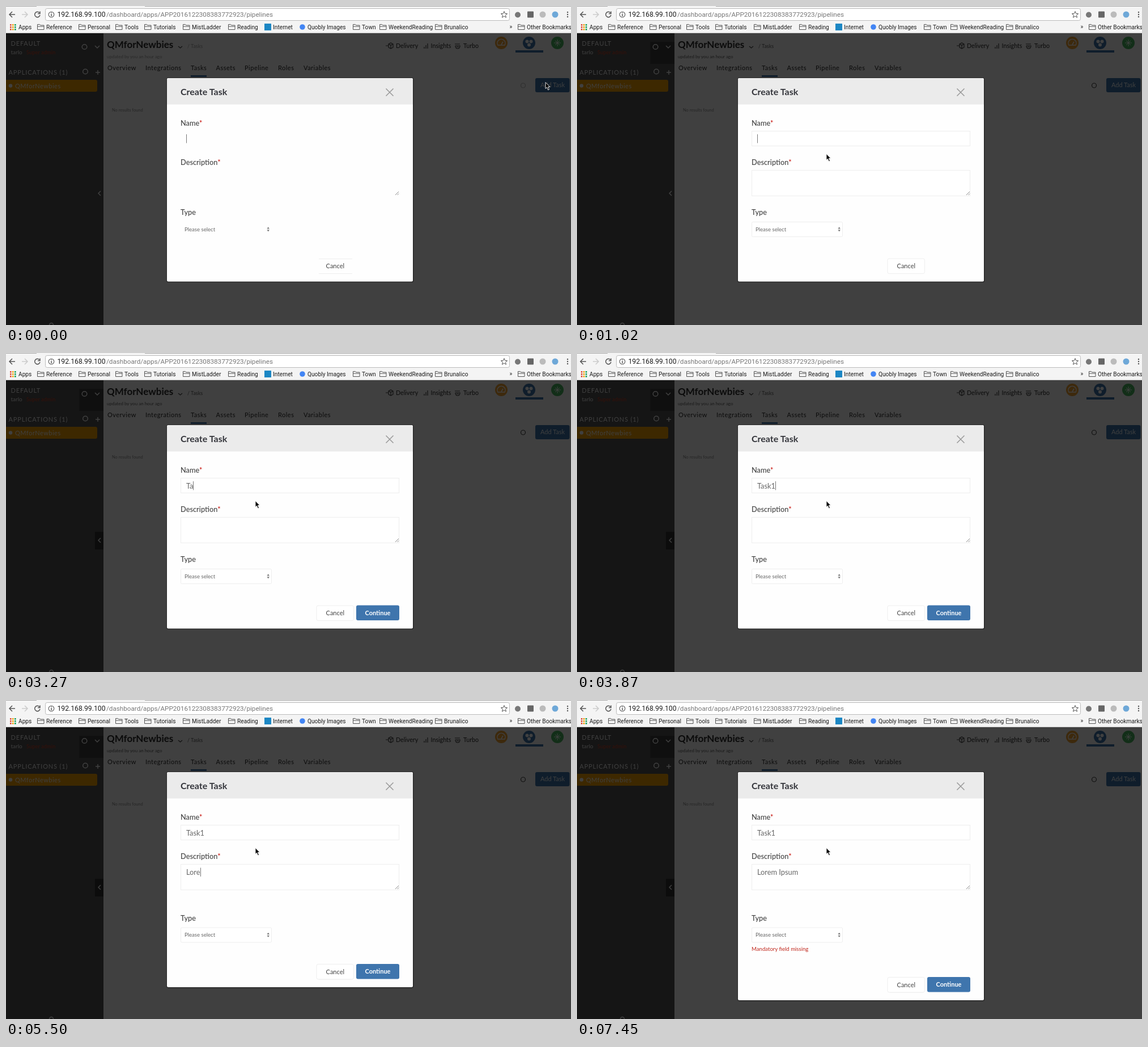
Write an HTML page that moves like this. It is 997 px wide and 562 px high and loops after 8 s.

```html
<!DOCTYPE html>
<html lang="en">
<head>
<meta charset="utf-8">
<title>Create task</title>
<style>
  html, body { margin: 0; width: 100%; height: 100%; overflow: hidden; background: #404040; }
  svg { display: block; width: 997px; height: 562px; }
  text { font-family: Lato, sans-serif; white-space: pre; }
  .chrome text { font-family: Roboto, sans-serif; font-size: 10.2px; fill: #1c1c1c; }
  .chrome .host { font-size: 12.2px; }
  .chrome .path { font-size: 11.7px; fill: #777; }
  .line { fill: none; stroke: #555; stroke-width: 1.5; }
  .dark { fill: none; stroke: #111; stroke-width: 1.2; }
  .tabs text { font-size: 11px; letter-spacing: .5px; fill: #0b0b0b; }
  .tools text { font-size: 10.7px; fill: #0b0b0b; }
  .side text { font-size: 11px; letter-spacing: .85px; fill: #404040; }
  .side .line { stroke: #404040; }
  .label { font-size: 12.8px; font-weight: 500; fill: #444; }
  .star { fill: #c8150f; }
  .typed { font-size: 12.8px; fill: #666; }
  .small { font-size: 9.6px; fill: #666; }
  .error { font-size: 9.6px; fill: #c0271c; }
  .button { font-size: 11px; text-anchor: middle; }
  .field { fill: #fff; stroke: #eee; }
</style>
</head>
<body>
<svg viewBox="0 0 997 562">
  <rect width="997" height="562" fill="#404040"/>

  <g class="side">
    <rect y="48" width="172" height="514" fill="#151515"/>
    <rect id="corner" x="129.5" y="63.5" width="42.5" height="38.5" fill="#0f0f0f"/>
    <rect id="handle" x="157" y="315" width="15" height="31" fill="#0c0c0c"/>
    <text x="8.5" y="69.5">DEFAULT</text>
    <text x="8.5" y="85" style="font-size:10px;letter-spacing:0">tarlo</text>
    <text x="36" y="85" style="font-size:9.4px;letter-spacing:0;fill:#36110a">Super admin</text>
    <circle class="line" cx="138.5" cy="72" r="4.3"/>
    <path class="line" d="M157 70l4 4 4-4" stroke-width="2"/>
    <text x="4.5" y="120.5">APPLICATIONS (1)</text>
    <circle class="line" cx="140" cy="115.5" r="4.3"/>
    <path class="line" d="M158 117h8M162 113v8"/>
    <path d="M0 130h158q3 0 3 3v15q0 3-3 3h-158z" fill="#3d2800"/>
    <circle cx="8" cy="140.5" r="3.3" fill="#404040"/>
    <text x="16" y="144.5" style="letter-spacing:.5px">QMforNewbies</text>
    <path class="line" d="M167 326l-4 4 4 4"/>
    <circle class="line" cx="80" cy="562" r="3.5"/>
  </g>

  <text x="178" y="74" font-size="17" font-weight="700" fill="#0b0b0b">QMforNewbies</text>
  <path class="dark" d="M304 71l3.5 3 3.5-3" stroke-width="2"/>
  <g id="crumbs" fill="#191919">
    <text x="320" y="74" font-size="9">/ Tasks</text>
    <text x="178" y="91.5" font-size="8">updated by you an hour ago</text>
  </g>
  <g class="tabs" id="tabs"></g>
  <rect x="326" y="122" width="28" height="3" fill="#0f1d2b"/>
  <text x="187" y="185.5" font-size="7.5" fill="#252525">No results found</text>

  <g class="tools">
    <path class="dark" d="M670 70h5M675 67l4-2 4 2v6l-4 2-4-2zM675 67l4 2 4-2M679 69v6"/>
    <text x="688" y="74">Delivery</text>
    <path class="dark" d="M738 75v-3M741 75v-6M744 75v-9" stroke-width="2"/>
    <text x="749.5" y="74">Insights</text>
    <path class="dark" d="M792 67h9M793 70h8q0 5-4 5t-4-5M795 72h4"/>
    <text x="807" y="74">Turbo</text>
  </g>
  <circle cx="874" cy="65" r="11" fill="#3d290c"/>
  <path d="M868 69a7 7 0 1 1 12 0zM874 68l3-5" fill="none" stroke="#404040" stroke-width="1.5"/>
  <circle cx="923" cy="65" r="11" fill="#0f1d2b"/>
  <g fill="#404040"><circle cx="919.5" cy="62.5" r="3"/><circle cx="926.5" cy="62.5" r="3"/><circle cx="923" cy="68.5" r="3"/></g>
  <rect x="899" y="78" width="49" height="4" fill="#0f1d2b"/>
  <circle cx="973" cy="65" r="11" fill="#122e18"/>
  <path d="M967 65h12M973 59v12M969 61l8 8M977 61l-8 8" stroke="#404040"/>
  <circle id="spinner" class="dark" cx="912.5" cy="140" r="4"/>
  <rect x="934" y="127" width="60.5" height="25" rx="3" fill="#0f1d2b"/>
  <text class="button" x="964.5" y="143" fill="#404040">Add Task</text>

  <g class="chrome">
    <rect width="997" height="48" fill="#f4f4f4"/>
    <path d="M0 .5h54M245 .5h752" stroke="#aaa"/>
    <path d="M0 47.5h997" stroke="#c4c4c4"/>
    <path class="line" d="M16 15h-10M11 10l-5 5 5 5"/>
    <path class="line" d="M28 15h10M33 10l5 5-5 5" style="stroke:#ccc"/>
    <path class="line" d="M59 12a4.7 4.7 0 1 0 1 4M60 9.5v4h-4"/>
    <rect x="69.5" y="4.5" width="819" height="21" rx="3" fill="#fff" stroke="#bbb"/>
    <circle class="line" cx="80" cy="15" r="4.8" style="stroke-width:1.1"/>
    <path class="line" d="M80 14v4M80 11.5v1.3"/>
    <text class="host" x="90.5" y="19">192.168.99.100</text>
    <text class="path" x="177" y="19">/dashboard/apps/APP2016122308383772923/pipelines</text>
    <path class="line" style="stroke-width:1" d="M879 9.5l1.6 3.8 4 .3-3.1 2.6 1 4-3.5-2.2-3.5 2.2 1-4-3.1-2.6 4-.3z"/>
    <circle cx="903" cy="15.5" r="5" fill="#777"/>
    <rect x="920" y="9.5" width="11" height="11" rx="1" fill="#666"/>
    <circle cx="947" cy="15" r="5.5" fill="#bbb"/>
    <circle cx="969" cy="15" r="5.5" fill="#6ea8d8"/>
    <g fill="#555"><circle cx="991" cy="11" r="1.2"/><circle cx="991" cy="15" r="1.2"/><circle cx="991" cy="19" r="1.2"/></g>
    <g id="bookmarks"></g>
    <rect x="456" y="31" width="12" height="12" fill="#1b87c4"/>
    <circle cx="523" cy="37" r="4.8" fill="#4285f4"/>
    <text x="888.5" y="40">»</text>
  </g>

  <rect id="shadow" x="283" y="126" width="436.5" rx="3.5" fill="#292929"/>
  <rect id="modal" x="284" y="127" width="434" rx="2.5" fill="#fefefe"/>
  <path d="M284 173.5v-44q0-2.5 2.5-2.5h429q2.5 0 2.5 2.5v44z" fill="#ebebeb"/>
  <text x="308" y="157" font-size="16" font-weight="700" fill="#34353b">Create Task</text>
  <path d="M670.5 145.5l13 13M683.5 145.5l-13 13" stroke="#999" stroke-width="1.5"/>
  <text class="label" x="308" y="210.5">Name<tspan class="star">*</tspan></text>
  <text class="label" x="308" y="279.5">Description<tspan class="star">*</tspan></text>
  <g id="boxes">
    <rect class="field" x="308.5" y="220.5" width="385" height="26"/>
    <rect class="field" x="308.5" y="289.5" width="385" height="45"/>
  </g>
  <path d="M687 333l6-6M690.5 333l2.5-2.5" stroke="#888"/>
  <text class="typed" id="name" x="318" y="239"></text>
  <text class="typed" id="description" x="318" y="308"></text>
  <rect id="caret" width="1" height="15.5" fill="#777"/>
  <text class="error" id="descriptionError" x="308" y="350">Mandatory field missing</text>

  <g id="type">
    <text class="label" x="308" y="368">Type</text>
    <rect class="field" id="select" x="308.5" y="380.5" width="160" height="26" rx="2"/>
    <text class="small" x="315" y="396.5">Please select</text>
    <path d="M460.5 392.5l2.2-3.3 2.2 3.3zM460.5 394.3l2.2 3.3 2.2-3.3z" fill="#777"/>
    <text class="error" id="typeError" x="308" y="421.5">Mandatory field missing</text>
  </g>
  <g id="buttons">
    <path d="M552 445.5h59M552 471.5h59" stroke="#eee"/>
    <rect class="field" id="cancelBox" x="548" y="445" width="65.5" height="26.5" rx="3"/>
    <text class="button" x="580.8" y="462" fill="#444">Cancel</text>
    <g id="continue">
      <rect x="618" y="444.5" width="76" height="26.5" rx="3" fill="#3f75ad"/>
      <text class="button" x="656" y="461.5" font-weight="700" fill="#fff">Continue</text>
    </g>
  </g>
  <path id="cursor" d="M0 0v11l2.5-2.3 2 4.7 2-.9-2-4.5h3.4z" stroke="#fff" stroke-width=".9"/>
</svg>
<script>
const LOOP = 8000;
const $ = id => document.getElementById(id);

function add(parent, tag, attrs, text = '') {
  const node = document.createElementNS('http://www.w3.org/2000/svg', tag);
  for (const key in attrs) node.setAttribute(key, attrs[key]);
  node.textContent = text;
  parent.append(node);
}

const tabs = { Overview: 179, Integrations: 246, Tasks: 326, Assets: 370.5, Pipeline: 421, Roles: 480, Variables: 525 };
for (const label in tabs) add($('tabs'), 'text', { x: tabs[label], y: 112.5 }, label);

const bookmarks = {
  Apps: 22, Reference: 71, Personal: 144, Tools: 209, Tutorials: 260, MistLadder: 328, Reading: 408,
  Internet: 471, 'Quobly Images': 532, Town: 628, WeekendReading: 675, Brunalico: 773, 'Other Bookmarks': 919
};
const noFolder = ['Apps', 'Internet', 'Quobly Images'];
for (const label in bookmarks) {
  const x = bookmarks[label];
  add($('bookmarks'), 'text', { x, y: 40.5 }, label);
  if (!noFolder.includes(label)) {
    add($('bookmarks'), 'path', {
      d: `M${x - 15.5} 41.5v-9h4l1.5 1.5h6v7.5zM${x - 15.5} 36h11.5`, fill: 'none', stroke: '#555'
    });
  }
}
const dots = ['#db4437', '#f4a000', '#0f9d58', '#4285f4'];
for (let i = 0; i < 9; i++) {
  const row = Math.floor(i / 3);
  add($('bookmarks'), 'rect', {
    x: 7 + i % 3 * 4, y: 32 + row * 4, width: 2.6, height: 2.6, fill: dots[(i + row) % 4]
  });
}

// Value of the last [time, value] step reached.
const at = (steps, t) => steps.reduce((value, [time, next]) => t >= time ? next : value, steps[0][1]);

const nameSteps = [[0, ''], [2820, 'T'], [3270, 'Ta'], [3420, 'Tas'], [3570, 'Task'], [3870, 'Task1']];
const descriptionSteps = [
  [0, ''], [4910, 'L'], [5350, 'Lor'], [5500, 'Lore'], [5800, 'Lorem'], [5950, 'Lorem '],
  [6100, 'Lorem I'], [6400, 'Lorem Ip'], [6850, 'Lorem Ips'], [7000, 'Lorem Ipsu'], [7150, 'Lorem Ipsum']
];
const caretSteps = [[0, 1], [1320, 0], [1770, 1], [2220, 0], [2670, 1], [7450, 0]];

const show = (id, opacity) => $(id).setAttribute('opacity', +opacity);
const shift = (id, x, y) => $(id).setAttribute('transform', `translate(${x} ${y})`);

function render(t) {
  const move = t < 140 ? 0 : Math.min(7, Math.floor((t - 140) / 146.6) + 1) / 7;
  const ease = move * move * (3 - 2 * move);
  shift('cursor', 952 - 512 * ease, 134.5 + 126 * ease);

  const settled = t >= 290;
  for (const id of ['corner', 'boxes', 'select', 'cancelBox']) show(id, settled);
  show('spinner', settled ? 1 : .35);
  show('crumbs', settled ? 1 : .6);
  show('handle', t >= 1320);
  show('continue', t >= 1320);

  const inDescription = t >= 4320;
  const bottom = at([[0, 0], [4320, 20.5], [7450, 43.5]], t);
  shift('type', 0, inDescription ? 20.5 : 0);
  shift('buttons', 0, bottom);
  $('modal').setAttribute('height', 358.5 + bottom);
  $('shadow').setAttribute('height', 361 + bottom);

  $('name').textContent = at(nameSteps, t);
  $('description').textContent = at(descriptionSteps, t);
  const active = $(inDescription ? 'description' : 'name');
  const width = active.textContent ? active.getComputedTextLength() : 0;
  shift('caret', Math.round(318 + width), inDescription ? 295.5 : 226);
  show('caret', at(caretSteps, t));
  show('descriptionError', at([[0, 0], [4320, 1], [4910, .5], [5050, 0]], t));
  show('typeError', t >= 7450);
}

function tick() {
  render(performance.now() % LOOP);
  requestAnimationFrame(tick);
}
tick();
</script>
</body>
</html>
```
